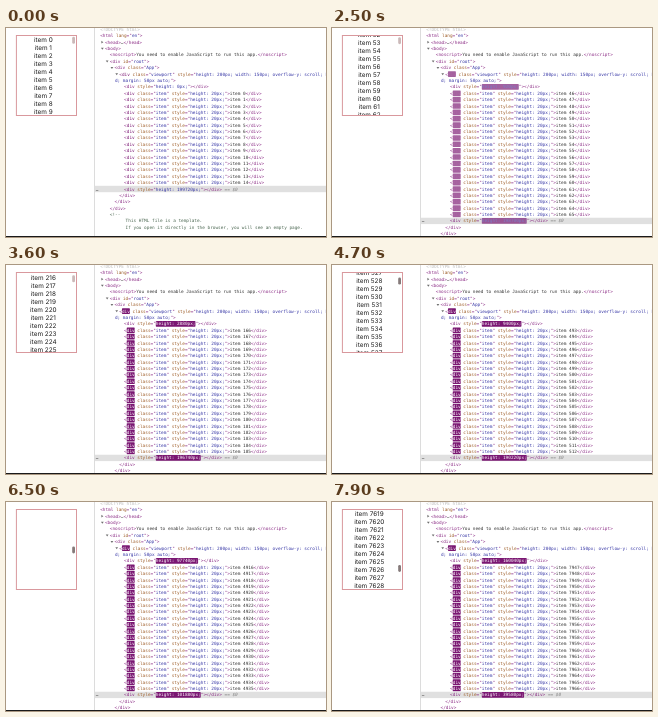
An HTML page that plays this animation: 320x209 px, repeating every 8000 ms.

```html
<!DOCTYPE html>
<html lang="en">
<head>
<meta charset="utf-8">
<title>Virtual list</title>
<style>
  html, body { margin: 0; width: 100%; height: 100%; overflow: hidden; background: #fff; }
  svg { display: block; width: 320px; height: 209px; }
  text { white-space: pre; text-rendering: geometricPrecision; }
  #list text { font: 16px Inter, "Liberation Sans", sans-serif; text-anchor: middle; fill: #1c1c1c; }
  #tree text { font: 11px "DejaVu Sans Mono", "Liberation Mono", monospace; fill: #333; }
  .tag { fill: #8a2a84; }
  .attr { fill: #9c5a24; }
  .val { fill: #3434a4; }
  .note { fill: #4a6650; }
  .dim { fill: #bcbcbc; }
  .ref { fill: #808080; font-style: italic; }
  .arrow { fill: #6e6e6e; }
</style>
</head>
<body>
<svg viewBox="0 0 320 209">
  <defs><clipPath id="port"><rect x="11" y="8" width="59" height="79"/></clipPath></defs>
  <g clip-path="url(#port)"><g id="list" transform="scale(.399)"></g></g>
  <rect id="thumb" x="66.2" width="2.8" height="7" rx="1.4"/>
  <rect x="10.4" y="7.5" width="60.1" height="80" fill="none" stroke="#d9989d"/>
  <rect x="88" y="0" width="1" height="209" fill="#dcdcdc"/>
  <g id="tree" transform="scale(.399)"></g>
  <rect y="208" width="320" height="1" fill="#1a1a1a"/>
</svg>
<script>
const LOOP = 8000, STEP = 100, TOTAL = 10000;
const CHAR = 6.622, LINE = 16, LEFT = 236;
const PURPLE = [122, 22, 114], BLUE = [52, 52, 164];
const $ = id => document.getElementById(id);

// time, value pairs
const scrollKeys = [0,0, 100,2, 200,5, 400,5, 500,6.5, 600,8, 800,8, 1500,49, 2500,52.6, 2700,60,
  3600,215.9, 4500,420, 5300,850, 5700,2100, 7200,7563.55, 7900,7619];
const itemKeys = [0,0, 400,0, 600,3, 800,3, 1500,38, 2500,46, 2700,50,
  3600,166, 4500,390, 5300,800, 5700,1896, 7200,7558, 7900,7947];
const padKeys = [0,0, 400,0, 600,3, 800,3, 1500,32, 2500,46, 2700,49,
  3600,144, 4500,370, 5300,770, 5700,1835, 7200,7558, 7900,8002];
const flashKeys = [0,0, 100,.6, 200,1, 1900,1, 2500,.68, 2700,1, 7900,1];

function at(keys, t) {
  for (let i = 2; i < keys.length; i += 2) {
    if (t <= keys[i]) {
      const k = (t - keys[i - 2]) / (keys[i] - keys[i - 2]);
      return keys[i - 1] + k * (keys[i + 1] - keys[i - 1]);
    }
  }
  return keys[keys.length - 1];
}

const esc = s => s.replace(/&/g, "&amp;").replace(/</g, "&lt;");
const span = (cls, s, fill) =>
  `<tspan class="${cls}"${fill ? ` style="fill:${fill}"` : ""}>${esc(s)}</tspan>`;
const tag = s => span("tag", s);
const attr = (name, value) =>
  tag(" ") + span("attr", name) + tag('="') + span("val", value) + tag('"');

const middle = row => 3.5 + row * LINE;
const textAt = (x, row, body) => `<text x="${x}" y="${middle(row) + 3.8}">${body}</text>`;
const line = (row, depth, body) => textAt(LEFT + depth * 12, row, body);

function arrow(row, depth, open) {
  const x = LEFT + depth * 12 - 10, y = middle(row);
  const d = open ? `M${x} ${y - 2}h7l-3.5 5z` : `M${x + 1} ${y - 3.5}v7l5-3.5z`;
  return `<path class="arrow" d="${d}"/>`;
}

// Recently changed markup: purple patch whose text turns from white to its own colour
function patch(row, depth, from, count, a) {
  if (!a) return "";
  const x = LEFT + depth * 12 + from * CHAR;
  return `<rect x="${x}" y="${middle(row) - 7}" width="${count * CHAR}" height="14" rx="1.5" fill="rgb(${PURPLE})" fill-opacity="${a}"/>`;
}
function lit(rgb, a) {
  const k = Math.max(0, 2 * a - 1);
  return `rgb(${rgb.map(c => Math.round(c + (255 - c) * k))})`;
}
const openDiv = a => tag("<") + span("tag", "div", lit(PURPLE, a));

function padRow(row, px, a, selected) {
  const style = `height: ${px}px;`;
  return patch(row, 5, 12, style.length, a) + line(row, 5,
    tag("<div ") + span("attr", "style") + tag('="') +
    span("val", style, lit(BLUE, a)) + tag('"></div>') +
    (selected ? span("ref", " == $0") : ""));
}

const head =
  line(0, 0, span("dim", "<!DOCTYPE html>")) +
  line(1, 0, tag("<html") + attr("lang", "en") + tag(">")) +
  arrow(2, 1, false) + line(2, 1, tag("<head>") + "…" + tag("</head>")) +
  arrow(3, 1, true) + line(3, 1, tag("<body>")) +
  line(4, 2, tag("<noscript>") + "You need to enable JavaScript to run this app." + tag("</noscript>")) +
  arrow(5, 2, true) + line(5, 2, tag("<div") + attr("id", "root") + tag(">")) +
  arrow(6, 3, true) + line(6, 3, tag("<div") + attr("class", "App") + tag(">")) +
  arrow(7, 4, true) +
  textAt(273, 8, span("val", "d; margin: 50px auto;") + tag('">'));

function tree(t) {
  const a = at(flashKeys, t);
  const first = Math.round(at(itemKeys, t)), pad = Math.round(at(padKeys, t));
  const count = Math.min(20, 15 + Math.floor(at(scrollKeys, t)));
  let out = head + patch(7, 4, 1, 3, a) + line(7, 4, openDiv(a) + attr("class", "viewport") +
    tag(" ") + span("attr", "style") + tag('="') +
    span("val", "height: 200px; width: 150px; overflow-y: scroll; border: 1px solid re"));
  out += padRow(9, pad * 20, a);
  for (let i = 0; i < count; i++) {
    const row = 10 + i;
    out += patch(row, 5, 1, 3, a) + line(row, 5, openDiv(a) + attr("class", "item") +
      attr("style", "height: 20px;") + tag(">") + `item ${first + i}` + tag("</div>"));
  }
  let row = 10 + count;
  out += `<rect x="223" y="${middle(row) - 8}" width="580" height="16" fill="#e0e0e0"/>`;
  out += textAt(225, row, "…") + padRow(row, (TOTAL - pad - count + 1) * 20, a, true);
  for (let depth = 4; depth > 1; depth--) out += line(++row, depth, tag("</div>"));
  out += line(++row, 2, span("note", "<!--"));
  out += line(++row, 2, span("note", "      This HTML file is a template."));
  out += line(++row, 2, span("note", "      If you open it directly in the browser, you will see an empty page."));
  return out;
}

// Fast scrolling outruns the rendered rows
const blank = t => (t >= 5600 && t <= 6000) || (t >= 6500 && t <= 6700);

function list(t, top) {
  if (blank(t)) return "";
  let out = "";
  for (let i = Math.floor(top); i < top + 10; i++)
    out += `<text x="93.5" y="${30 + (i - top) * 20 + 5.8}">item ${i}</text>`;
  return out;
}

const start = performance.now();
let shown = -1;

function draw() {
  const t = Math.floor(((performance.now() - start) % LOOP) / STEP) * STEP;
  if (t !== shown) {
    shown = t;
    const top = at(scrollKeys, t);
    $("list").innerHTML = list(t, top);
    $("thumb").setAttribute("y", 8.8 + top / TOTAL * 71);
    // the thumb darkens while it is dragged
    $("thumb").setAttribute("fill", t > 3600 ? "#857a7a" : "#cbb9b9");
    $("tree").innerHTML = tree(t);
  }
  requestAnimationFrame(draw);
}
draw();
</script>
</body>
</html>
```
